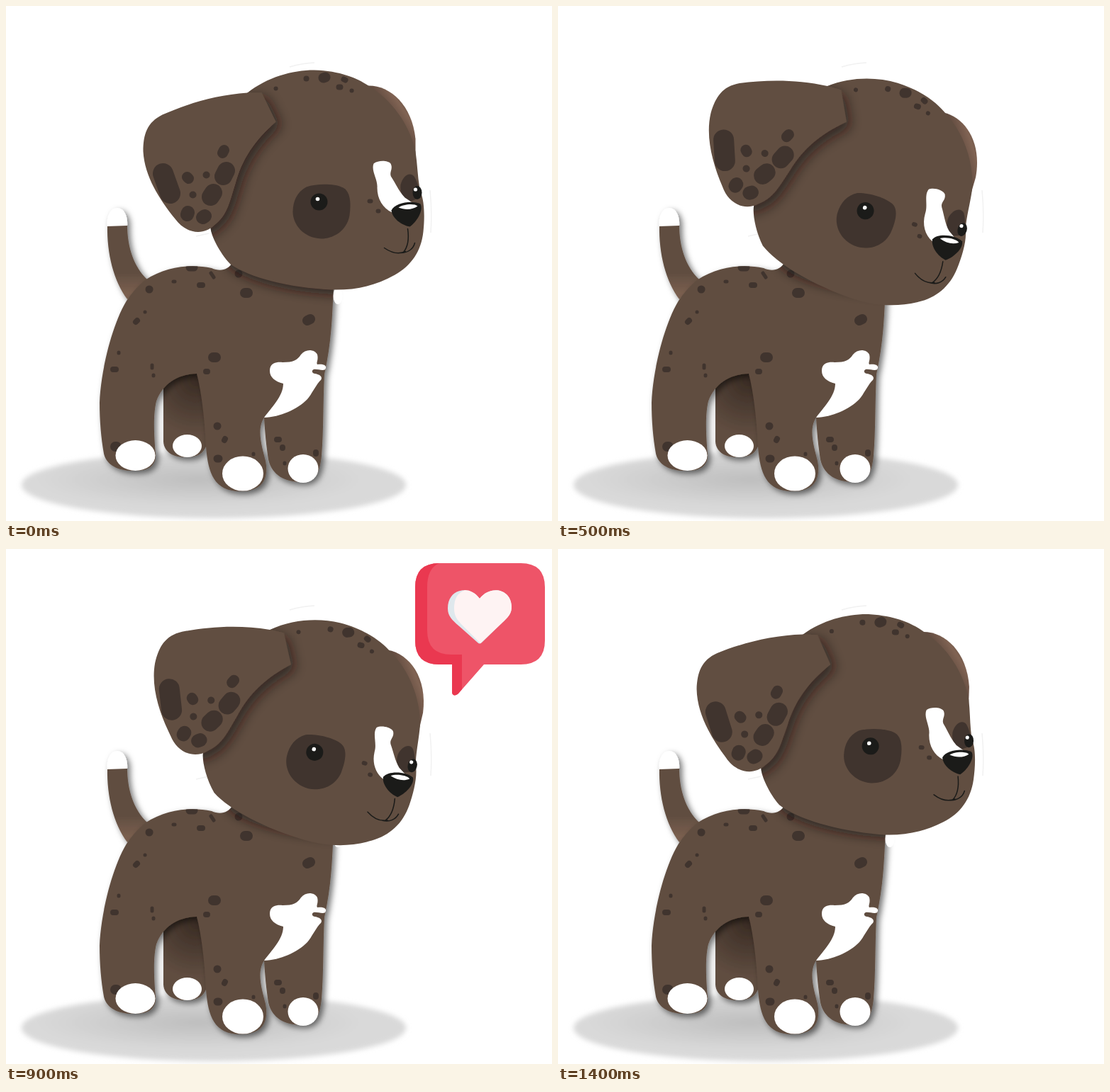
Recreate the animation shown at these times as an HTML page. Size 770 px wide and 727 px high, loop 1.5 s.

```html
<!DOCTYPE html>
<html lang="en">
<head>
<meta charset="utf-8">
<title>Puppy</title>
<style>
  html, body { margin: 0; width: 100%; height: 100%; overflow: hidden; background: #fff; }
  svg { display: block; width: 770px; height: 727px; }
  .fur { fill: #614e41; }
  .spot { fill: #40342e; }
  .dots { fill: none; stroke: #40342e; stroke-linecap: round; }
  .ink { fill: #1b1b19; }
  .white { fill: #fff; }
  .line { fill: none; stroke: #1b1b19; stroke-width: 1.5; stroke-linecap: round; }
  .wisp { fill: none; stroke: #f1f1f1; stroke-width: 1.5; }
  #head { transform-origin: 395px 254.5px; }
  #bubble { visibility: hidden; }
</style>
</head>
<body>
<svg viewBox="0 0 770 727">
  <defs>
    <path id="bodyShape" d="M320 361C313 374 301 375 290 370C262 364 226 367 196 387C188 393 181 401 172 413C152 443 134 510 132 560C132 585 134 610 138 632C142 649 160 657 182 656C202 656 212 648 211 632C209 610 207 578 212 558C222 532 243 520 269 519C276 545 281 590 282 622C285 660 294 685 330 685C366 685 370 663 366 642C361 622 353 598 364 581C365 600 367 622 370 640C375 663 394 672 418 672C438 672 443 655 445 635C448 600 447 560 449 520C459 475 460 440 462 395L400 300Z"/>
    <path id="headShape" d="M318 364C302 347 291 324 290 313C285 250 300 155 342 122C370 100 405 90 436 90C475 91 500 103 514 113C545 132 570 165 579 205C582 225 582 245 586 262C592 275 592 300 590 318C587 346 573 366 550 379C520 396 490 401 460 400C400 397 345 383 318 364Z"/>
    <path id="earShape" d="M382 163L362 122L342 122C297 125 256 138 222 153C200 164 195 181 195 205C197 240 218 273 240 300C255 321 280 324 295 309C314 295 317 275 325 250C334 217 351 190 382 163Z"/>
    <clipPath id="bodyClip"><use href="#bodyShape"/></clipPath>
    <clipPath id="headClip"><use href="#headShape"/></clipPath>
    <filter id="drop" x="-20%" y="-20%" width="140%" height="140%">
      <feDropShadow dx="4" dy="4" stdDeviation="4.5" flood-color="#000" flood-opacity=".55"/>
    </filter>
    <filter id="cast" x="-30%" y="-30%" width="160%" height="160%">
      <feDropShadow dx="7" dy="6" stdDeviation="9" flood-color="#1c130e" flood-opacity=".68"/>
    </filter>
    <filter id="under" x="-20%" y="-20%" width="140%" height="140%">
      <feDropShadow dx="0" dy="7" stdDeviation="8" flood-color="#1c130e" flood-opacity=".65"/>
    </filter>
    <filter id="soft" x="-10%" y="-20%" width="120%" height="140%"><feGaussianBlur stdDeviation="3.5"/></filter>
    <radialGradient id="ground" cx=".46" cy=".42" r=".42">
      <stop offset="0" stop-color="#bebebe"/><stop offset="1" stop-color="#d9d9d9"/>
    </radialGradient>
    <radialGradient id="farLeg" gradientUnits="userSpaceOnUse" cx="268" cy="528" r="80">
      <stop offset="0" stop-color="#3a2c24"/><stop offset="1" stop-color="#614e41"/>
    </radialGradient>
    <linearGradient id="tail" x1="0" y1="0" x2="0" y2="1">
      <stop offset=".65" stop-color="#614e41"/><stop offset=".92" stop-color="#7a5f4f"/>
    </linearGradient>
    <linearGradient id="farEar" gradientUnits="userSpaceOnUse" x1="542" y1="162" x2="570" y2="143">
      <stop offset="0" stop-color="#58443a"/><stop offset=".75" stop-color="#806353"/><stop offset="1" stop-color="#6f5546"/>
    </linearGradient>
  </defs>

  <ellipse cx="293" cy="676" rx="271" ry="47" fill="url(#ground)" filter="url(#soft)"/>
  <path class="wisp" d="M400 86Q416 81 435 80M268 325L286 321M598 260Q601 290 599 320"/>

  <g filter="url(#drop)">
    <path fill="url(#tail)" d="M143 309C142 350 152 388 171 414L200 387C180 368 171 340 171 309Z"/>
    <path class="white" d="M143 311C141 296 148 285 157 285C168 286 172 299 171 310Z"/>
  </g>
  <g filter="url(#drop)">
    <path fill="url(#farLeg)" d="M222 530V615C223 631 238 638 256 637C274 636 281 629 284 615L280 515H240Z"/>
    <ellipse class="white" cx="255.500" cy="621" rx="20.500" ry="16"/>
  </g>
  <use href="#bodyShape" class="fur" filter="url(#drop)"/>
  <ellipse class="white" cx="468" cy="409" rx="6.500" ry="12"/>
  <g class="dots" clip-path="url(#bodyClip)">
    <path stroke-width="5" d="M289 377l4 6M196 432h.1M159 489v1M206 507v4M208 521v1M349 632v1M393 645v1M236 389h2"/>
    <path stroke-width="8" d="M273 394h4M183 446l2-2M151 513h4M282 516h2M309 611l-1 2M382 612h3M390 623v1M437 630v2"/>
    <path stroke-width="11" d="M259 369h6M202 400h.1M328 378v.1M298 593v.1M298 639h2"/>
    <path stroke-width="14" d="M337 405h4M425 444l4-2M292 496h4M154 622h2"/>
  </g>
  <g class="white">
    <path d="M364 581C374 567 391 551 391 533C379 530 372 524 372 515C372 505 379 502 390 503C405 503 411 500 416 492C422 484 435 484 439 492C441 500 437 503 439 506C447 505 452 507 451 511C450 517 440 512 434 513C430 515 432 519 436 519C446 521 447 526 442 530C436 537 431 548 425 555C410 570 387 580 364 581Z"/>
    <ellipse cx="182.500" cy="634.500" rx="28" ry="21.500"/>
    <ellipse cx="334" cy="660" rx="29" ry="24.500"/>
    <ellipse cx="419" cy="653" rx="21.500" ry="20"/>
  </g>
  <g clip-path="url(#bodyClip)"><use href="#headShape" class="fur" filter="url(#under)"/></g>

  <g transform="translate(-1.5 .5)">
    <g id="head">
      <path fill="url(#farEar)" d="M510 112C542 110 574 138 579 187V212L540 190Z"/>
      <use href="#headShape" class="fur"/>
      <g class="dots">
        <path stroke-width="6" d="M382 116h.1M489 119h.1M526 289h1M514 275h2"/>
        <path stroke-width="8" d="M425 102h.1M478 103l2 1M471 114h2"/>
        <path stroke-width="14" d="M449 101l3-1"/>
      </g>
      <path class="spot" d="M425 255C440 250 465 250 477 256C488 262 488 280 486 295C482 318 462 328 446 328C421 327 406 308 406 290C406 275 412 262 425 255Z"/>
      <path class="spot" d="M558 252C561 239 571 233 577 240C582 248 584 256 586 270L570 276C560 270 557 262 558 252Z"/>
      <circle class="ink" cx="443" cy="276" r="12"/>
      <circle class="white" cx="441" cy="272" r="2.800"/>
      <ellipse class="ink" cx="581.500" cy="263" rx="6.500" ry="9.500"/>
      <circle class="white" cx="579" cy="258.500" r="2.600"/>
      <path class="white" d="M520 222C526 217 540 217 544 222C548 230 541 234 545 241C551 250 556 262 564 270L576 278L546 291C533 285 525 272 525 256C526 244 516 232 520 222Z"/>
      <path class="ink" d="M545 288C550 277 575 273 586 279C591 288 580 305 571 311C559 309 546 299 545 288Z"/>
      <path class="white" d="M555 284C562 279 578 278 582 282C575 287 565 288 555 284Z"/>
      <path class="line" d="M568 314C570 328 568 340 562 347M535 341C545 348 556 350 565 346M558 348C569 348 576 342 578 334"/>
      <g clip-path="url(#headClip)"><use href="#earShape" class="fur" filter="url(#cast)"/></g>
      <use href="#earShape" class="fur"/>
      <g class="dots">
        <path stroke-width="10" d="M284 238h.1M265 266h.1"/>
        <path stroke-width="15" d="M257 241l2 2M309 203l-2 4"/>
        <path stroke-width="19" d="M258 291l-1 3M282 296l-3 2"/>
        <path stroke-width="25" d="M312 232l-4 8M294 263l-4 6"/>
        <path stroke-width="29" d="M223 236l10 28"/>
      </g>
    </g>
  </g>

  <g id="bubble">
    <path fill="#ee5468" d="M611 20H726Q760 20 760 54V129Q760 163 726 163H674L638 204C634 208 629 207 629 202V163H611Q577 163 577 129V54Q577 20 611 20Z"/>
    <path fill="#ea3850" d="M611 20Q577 20 577 54V129Q577 163 611 163H629V202C629 207 634 208 638 204L643 198V149H628Q594 149 594 115V54Q594 27 611 20Z"/>
    <path fill="#dfe8ed" d="M668 70C654 51 623 55 623 84C623 95 630 101 638 108L665 132Q668 135 671 132L703 101C710 94 713 90 713 81C712 55 682 51 668 70Z"/>
    <path fill="#fef3f3" d="M668 70C661 61 654 58 647 58C637 62 632 70 632 84C632 95 637 101 644 108L669 133L703 101C710 94 713 90 713 81C712 55 682 51 668 70Z"/>
  </g>
</svg>
<script>
const STEP = 100, STEPS = 15, PEAK = 6, TILT = 20.5, RETURN = 2.2;
const head = document.getElementById('head');
const bubble = document.getElementById('bubble');

// The head eases down to its peak tilt, then comes back at a steady rate.
const tilt = n => n <= PEAK ? TILT * (n / PEAK) ** 1.25 : RETURN * (STEPS - n);

function draw(now) {
  const n = Math.floor(now / STEP) % STEPS;
  head.style.transform = `rotate(${tilt(n)}deg)`;
  bubble.style.visibility = n >= PEAK && n < 10 ? 'visible' : 'hidden';
}

let start;
function tick(now) {
  start ??= now;
  draw(now - start);
  requestAnimationFrame(tick);
}
draw(0);
requestAnimationFrame(tick);
</script>
</body>
</html>
```
